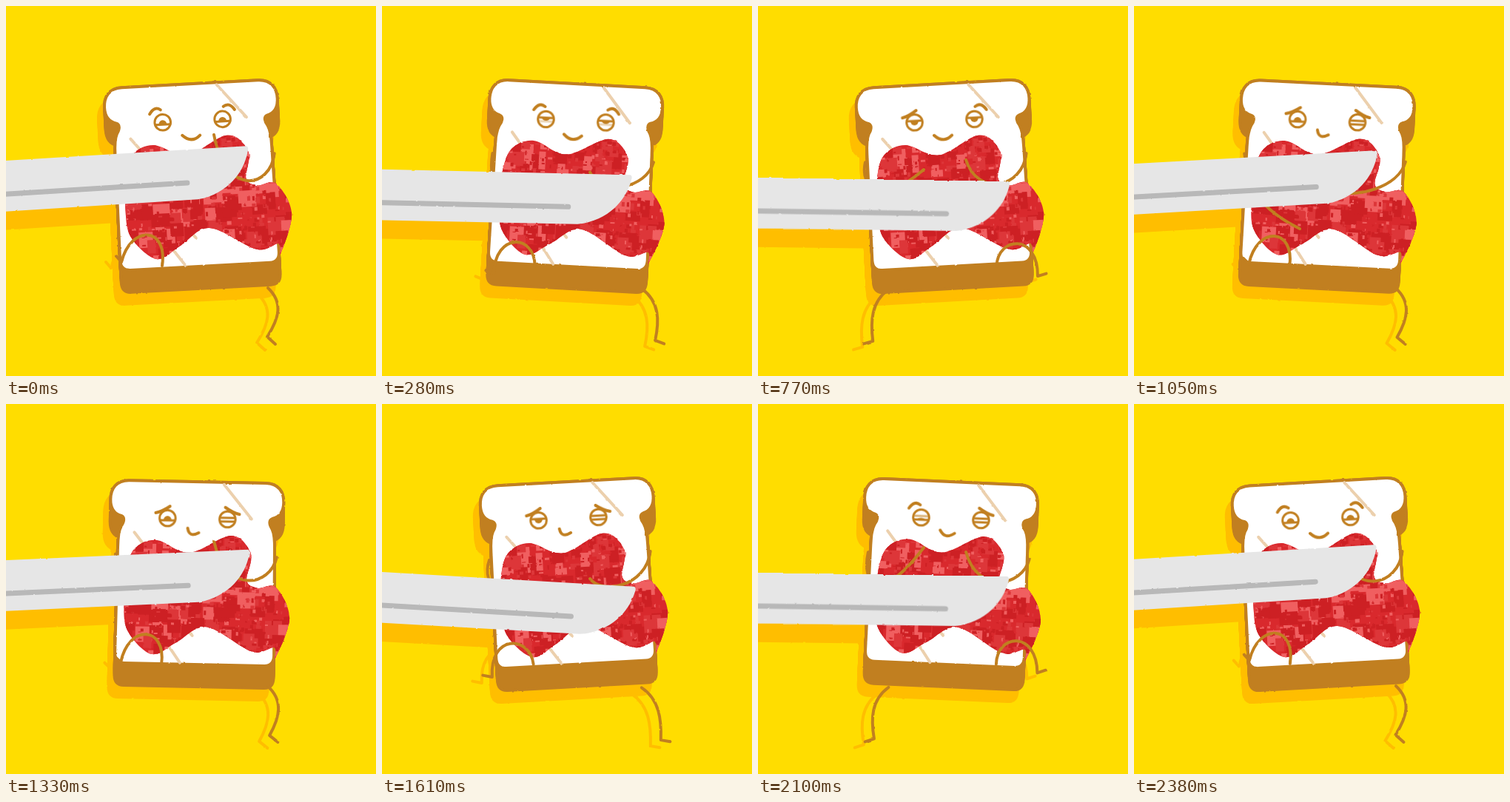
An HTML page for the animation above (2450 ms loop, 500 px wide and 500 px high).

```html
<!DOCTYPE html>
<html lang="en">
<head>
<meta charset="utf-8">
<title>Toast and knife</title>
<style>
html, body { margin: 0; width: 100%; height: 100%; overflow: hidden; background: #ffdd00; }
svg { display: block; width: 100vw; height: 100vh; }
.line { fill: none; stroke: #c17f20; stroke-width: 4; stroke-linecap: round; stroke-linejoin: round; }
.thin { stroke-width: 3; }
.shade { fill: #ffbe00; stroke: #ffbe00; stroke-width: 4; }
.shade-line { stroke: #ffbe00; }
.crust { fill: #c17f20; stroke: #c17f20; stroke-width: 4; }
.crumb { fill: none; stroke: #ecd0ad; stroke-width: 4; stroke-linecap: round; }
</style>
</head>
<body>
<svg viewBox="0 0 500 500">
  <defs>
    <path id="slice" d="M-92-140H92C110-140 117-128 117-114C117-100 110-94 102-92C97-90 98-84 102-78C106-70 106-60 106-50L108 93Q108 107 95 107H-94Q-107 107-107 93L-106-50C-106-60-106-70-102-78C-98-84-97-90-102-92C-110-94-117-100-117-114C-117-128-110-140-92-140Z"/>
    <path id="blade" d="M-480 0H-3Q0 0 0 4C-5 29-24 58-64 67L-72 68L-480 69Z"/>
    <clipPath id="jamClip"><path id="jamEdge"/></clipPath>
    <filter id="rough" filterUnits="userSpaceOnUse" x="-20" y="-20" width="540" height="540" color-interpolation-filters="sRGB">
      <feTurbulence type="fractalNoise" baseFrequency=".15" numOctaves="2" seed="4"/>
      <feColorMatrix values="1 0 0 0 0 0 1 0 0 0 0 0 1 0 0 0 0 0 0 1"/>
      <feDisplacementMap in="SourceGraphic" scale="2" xChannelSelector="R" yChannelSelector="G"/>
    </filter>
  </defs>
  <rect width="500" height="500" fill="#ffdd00"/>
  <g filter="url(#rough)">
    <use id="bladeShade" href="#blade" fill="#ffbe00"/>
    <g id="legShades" transform="translate(-14 8)"></g>
    <g transform="translate(-8 16)"><g id="breadShade" class="body shade"></g></g>
    <g id="back"></g>
    <g class="body">
      <g id="crust" class="crust"></g>
      <use href="#slice" fill="#fff" stroke="#c17f20" stroke-width="4"/>
      <path class="crumb" d="M36-137L74-91M-84-70L-64-45M-17 52L-3 68M-38 78L-19 105"/>
      <g id="jam" clip-path="url(#jamClip)"></g>
    </g>
  </g>
  <g id="face" class="body"></g>
  <g filter="url(#rough)">
    <g id="front"></g>
    <g id="knife">
      <use href="#blade" fill="#e6e6e6"/>
      <path d="M-480 45H-85" fill="none" stroke="#b8b8b8" stroke-width="7" stroke-linecap="round"/>
    </g>
  </g>
</svg>
<script>
const NS = 'http://www.w3.org/2000/svg';
const STEP = 70, FRAMES = 35, STROKE = FRAMES / 2, SWAY = FRAMES / 3, TAU = 2 * Math.PI;
const CX = 256, CY = 245, HIPS = 264;
const $ = id => document.getElementById(id);

function add(parent, tag, attrs) {
  const el = document.createElementNS(NS, tag);
  for (const k in attrs) el.setAttribute(k, attrs[k]);
  return parent.appendChild(el);
}
const mod = (a, n) => ((a % n) + n) % n;
const clamp = (v, a, b) => Math.max(a, Math.min(b, v));
const mix = (a, b, u) => a + (b - a) * u;
const mixAll = (p, q, u) => p.map((v, i) => mix(v, q[i], u));
const smooth = u => { u = clamp(u, 0, 1); return u * u * (3 - 2 * u); };
// Rises around a and falls around b.
const pulse = (t, a, b) => smooth((t - a + 1) / 2) - smooth((t - b + 1) / 2);

// One knife stroke: time, height of the tip, of the blade at the border, of right and left hand.
const stroke = [
  [0, 189, 209, 174, 235],
  [5.5, 247, 227, 236, 270],
  [7, 262, 234, 183, 280],
  [11, 237, 232, 208, 221],
  [12.5, 233, 228, 200, 194],
  [15, 195, 213, 251, 301]
];

// Periodic curve through the keys without overshoot.
function sample(keys, period, t) {
  const n = keys.length, key = k => keys[mod(k, n)];
  const time = k => key(k)[0] + Math.floor(k / n) * period;
  let i = n - 1;
  while (time(i) > t) i--;
  const span = time(i + 1) - time(i), u = (t - time(i)) / span;
  const rate = (k, c) => (key(k + 1)[c] - key(k)[c]) / (time(k + 1) - time(k));
  const slope = (k, c) => {
    const a = rate(k - 1, c), b = rate(k, c);
    return a * b > 0 ? 2 * a * b / (a + b) : 0;
  };
  return key(i).map((v, c) => c && mix(v, key(i + 1)[c], smooth(u)) +
    span * u * (1 - u) * ((1 - u) * slope(i, c) - u * slope(i + 1, c))).slice(1);
}

const tilt = f => -3.4 * Math.tanh(1.8 * Math.cos(TAU * (f / SWAY + .09)));

// Leg poses as hip, two handles, ankle and toe; x counts outwards from the hips' middle.
const bent = [
  [53, 351, 45, 298, 95, 295, 108, 346, 115, 338],
  [61, 352, 69, 316, 125, 315, 117, 375, 131, 374]
];
const straight = [
  [90, 381, 111, 401, 105, 422, 89, 447, 100, 457],
  [86, 384, 111, 399, 116, 428, 119, 456, 132, 456]
];

for (let y = 0; y <= 30; y += 3) {
  add($('crust'), 'use', { href: '#slice', y });
  add($('breadShade'), 'use', { href: '#slice', y });
}

function blob(p) {
  const n = p.length, at = k => p[mod(k, n)];
  let d = 'M' + p[0];
  for (let i = 0; i < n; i++) {
    const [a, b, c, e] = [at(i - 1), at(i), at(i + 1), at(i + 2)];
    d += `C${b[0] + (c[0] - a[0]) / 6} ${b[1] + (c[1] - a[1]) / 6} ${c[0] - (e[0] - b[0]) / 6} ${c[1] - (e[1] - b[1]) / 6} ${c}`;
  }
  return d + 'Z';
}
$('jamEdge').setAttribute('d', blob([
  [-93, -24], [-81, -50], [-53, -60], [-9, -44], [47, -68], [74, -44], [69, -8], [84, 2], [109, 1],
  [128, 42], [110, 96], [108, 82], [78, 88], [16, 56], [-25, 78], [-58, 94], [-91, 62], [-96, 20]
]));

let seed = 11;
const rnd = () => (seed = (seed * 16807) % 2147483647) / 2147483647;
function scatter(count, min, max) {
  const tones = ['#cd2024', '#cd2024', '#f05f60', '#dd3639'];
  for (let i = 0; i < count; i++) {
    const size = () => Math.round(mix(min, max, rnd()));
    add($('jam'), 'rect', {
      x: Math.round(rnd() * 250 - 108), y: Math.round(rnd() * 180 - 75),
      width: size(), height: size(), fill: tones[Math.floor(rnd() * tones.length)]
    });
  }
}
add($('jam'), 'rect', { x: -110, y: -80, width: 260, height: 190, fill: '#d9292d' });
scatter(220, 8, 24);
scatter(600, 1, 6);

const eyes = [-1, 1].map(side => {
  const g = add($('face'), 'g', { transform: `translate(${1 + side * 40.5} -90)` });
  add(g, 'circle', { r: 10.8, class: 'line thin' });
  return {
    upper: add(g, 'path', { class: 'line thin', d: 'M-10-2H10' }),
    lower: add(g, 'path', { class: 'line thin', d: 'M-10 3H10' }),
    pupil: add(g, 'path', { fill: '#c17f20' }),
    brow: add(g, 'path', { class: 'line', transform: `scale(${-side} 1)` })
  };
});
const mouth = add($('face'), 'path', { class: 'line' });

function drawFace(f) {
  const worry = [pulse(f, 9, 26), pulse(f, 13, 32)];
  const look = clamp(3 * Math.cos(TAU * (f + 1) / STROKE), -1, 1);
  eyes.forEach((eye, i) => {
    const w = worry[i], p = i ? look * (1 - w) : look, base = p > 0 ? 3 : -2;
    eye.upper.setAttribute('opacity', Math.min(1, 1 - p));
    eye.lower.setAttribute('opacity', Math.min(1, 1 + p));
    eye.pupil.setAttribute('d', `M-5.5 ${base}A5.5 ${Math.abs(p) * 6 + .01} 0 0 ${+(p > 0)} 5.5 ${base}Z`);
    const b = mixAll([-17, -12, -10, -23, -2, -17], [-16, -7, -7, -9, 3, -16], w);
    eye.brow.setAttribute('d', `M${b[0]} ${b[1]}Q${b.slice(2)}`);
  });
  const m = mixAll([-14, -71, -2, -59, 10, -70], [-12, -77, -10, -64, 3, -71], worry[1] * (1 + worry[0]) / 2);
  mouth.setAttribute('d', `M${m[0]} ${m[1]}Q${m.slice(2)}`);
}

const curve = p => `M${p.slice(0, 2)}C${p.slice(2, 8)}` + (p.length > 8 ? `L${p.slice(8)}` : '');
const limb = parent => add(parent, 'path', { class: 'line' });
const arms = [-1, 1].map(side => ({ side, el: limb($('front')) }));
const legs = [-1, 1].map(side => ({
  side, el: limb($('front')), shade: add($('legShades'), 'path', { class: 'line shade-line' })
}));

function drawLegs(beat, press) {
  const kick = pulse(beat, 9, 13.75);
  legs.forEach(({ side, el, shade }) => {
    const bend = side > 0 ? kick : 1 - kick;
    const pose = mixAll(mixAll(...straight, press), mixAll(...bent, press), bend);
    const d = curve(pose.map((v, i) => i % 2 ? v : HIPS + side * v));
    el.setAttribute('d', d);
    shade.setAttribute('d', d);
    const layer = bend > .5 ? $('front') : $('back');
    if (el.parentNode !== layer) layer.appendChild(el);
  });
}

function drawArms(angle, press, right, left) {
  const a = angle * Math.PI / 180, c = Math.cos(a), s = Math.sin(a);
  arms.forEach(({ side, el }) => {
    const x = side * 109, y = -40;
    const bend = side > 0 ? [357, 247, 297, 258, 281, right] : [mix(160, 126, press), 245, 165, 272, 224, left];
    el.setAttribute('d', curve([CX + x * c - y * s, CY + x * s + y * c, ...bend]));
  });
}

function draw(f) {
  const beat = mod(f, STROKE), angle = tilt(f);
  const [tip, border, right, left] = sample(stroke, STROKE, beat);
  const press = (tip - 189) / 73, x = 327 + 20 * press;
  const turn = Math.atan2(tip - border, x) * 180 / Math.PI;

  document.querySelectorAll('.body').forEach(b =>
    b.setAttribute('transform', `translate(${CX} ${CY}) rotate(${angle})`));
  drawFace(f);
  drawLegs(beat, press);
  drawArms(angle, press, right, left);
  $('knife').setAttribute('transform', `translate(${x} ${tip}) rotate(${turn})`);
  $('bladeShade').setAttribute('transform', `translate(${x - 4} ${tip + 25}) rotate(${turn})`);
}

let last = -1;
function tick() {
  const f = Math.floor(performance.now() / STEP) % FRAMES;
  if (f !== last) draw(last = f);
  requestAnimationFrame(tick);
}
tick();
</script>
</body>
</html>
```
